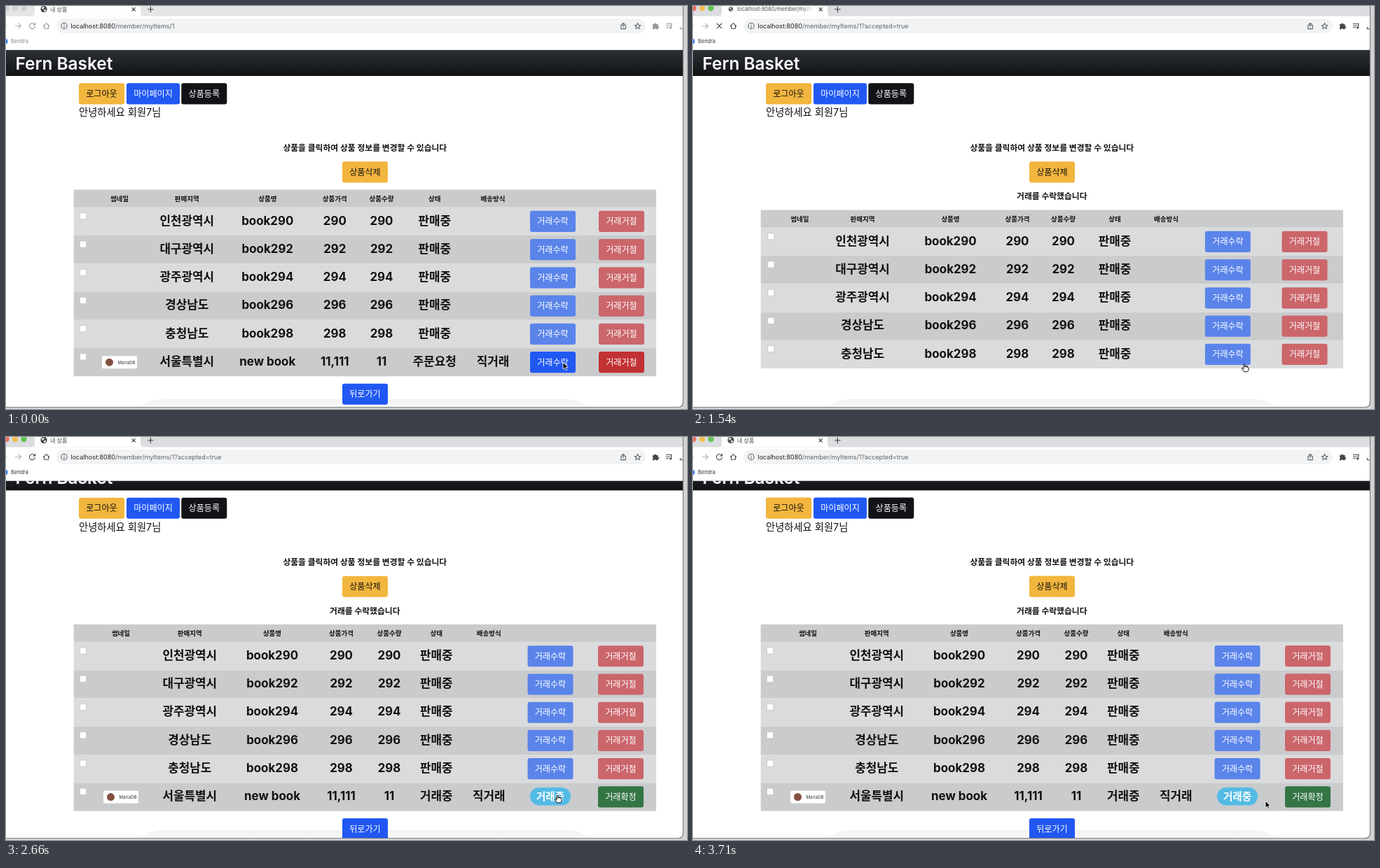
An HTML page that plays this animation: 972 by 576 pixels, repeating every 3.78 s.

```html
<!DOCTYPE html>
<html lang="ko">
<head>
<meta charset="utf-8">
<title>내 상품</title>
<style>
html, body { margin: 0; width: 100%; height: 100%; overflow: hidden; background: #fff; }
svg { display: block; width: 972px; height: 576px; }
text { font-family: Inter, "Noto Sans CJK KR", "Noto Sans CJK", sans-serif; white-space: pre; }
.line { fill: none; stroke: currentColor; stroke-width: 1.1; stroke-linecap: round; stroke-linejoin: round; }
</style>
</head>
<body>
<svg id="stage" viewBox="0 0 972 576" xmlns="http://www.w3.org/2000/svg">
  <defs>
    <linearGradient id="bar" x2="0" y2="1">
      <stop offset="0" stop-color="#2d3035"/><stop offset="1" stop-color="#101215"/>
    </linearGradient>
    <linearGradient id="dock" x2="0" y2="1">
      <stop offset="0" stop-color="#f1f1f1"/><stop offset="1" stop-color="#fafafa"/>
    </linearGradient>
    <linearGradient id="fade" gradientUnits="userSpaceOnUse" x1="155" x2="172">
      <stop offset="0" stop-color="#45484c"/><stop offset="1" stop-color="#45484c" stop-opacity="0"/>
    </linearGradient>
    <clipPath id="view"><path d="M0 62.5H966V566Q966 573 959 573H0Z"/></clipPath>
    <clipPath id="tabClip"><rect x="60" width="112" height="14"/></clipPath>
  </defs>
  <rect width="972" height="576" fill="#d3d3d4"/>
  <path d="M0 0H966V566Q966 573 959 573H0Z" fill="#fff"/>
  <g id="page" clip-path="url(#view)">
    <path d="M192 574Q205 562 225 562H800Q820 562 832 574Z" fill="url(#dock)"/>
    <g id="scroll"></g>
  </g>
  <g id="chrome">
    <rect width="966" height="62.5" fill="#fff"/>
    <rect id="strip" width="966" height="14.5" fill="#dee1e6"/>
    <path d="M36 14.5Q41 14.5 41 9V0H192V9Q192 14.5 197 14.5Z" fill="#fff"/>
    <g id="lights"></g>
    <g id="globe">
      <circle r="4.6" fill="#44474b"/>
      <path d="M-3.2-1.6Q-1.5-3.8.4-3.4L.8-1.6-1 .2-2.8-.2ZM-.2 1.2 2.4.4 3.4 1.4Q2.4 3.4.4 3.8Z" fill="#e8eaed"/>
    </g>
    <g id="tabText" clip-path="url(#tabClip)"></g>
    <path class="line" d="M180 2.6l4.4 4.4m0-4.4l-4.4 4.4M202.6 4.8h7.6m-3.8-3.8v7.6" color="#3c4043"/>
    <rect x="72" y="18" width="841" height="21" rx="10.5" fill="#f1f3f4"/>
    <path class="line" color="#aeb1b5" d="M-3 28.5H1M13.5 28.5h8m-3.6-3.6l3.6 3.6-3.6 3.6"/>
    <g id="tools">
      <path id="reload" class="line" d="M40.6 26A4 4 0 1 0 41.4 29.6M41.6 24.2V27H38.8"/>
      <path id="stop" class="line" d="M34.2 25l6.8 6.8m0-6.8l-6.8 6.8"/>
      <path class="line" d="M53.4 28.6l4.2-3.9 4.2 3.9M54.7 27.8v4.4h5.8v-4.4"/>
      <path d="M923 26h2.2a1.6 1.6 0 0 1 3.2 0h2.2v2.4a1.6 1.6 0 0 1 0 3.2v1.6h-2.6a1.4 1.4 0 0 0-2.6 0H923v-2.6a1.4 1.4 0 0 0 0-2.4Z" fill="currentColor"/>
      <path class="line" d="M942.4 25.2h8M942.4 28h5.4M942.4 30.8h3.4M949.6 25.4v5.6"/>
      <circle cx="948.6" cy="31" r="1.5" fill="currentColor"/>
      <path class="line" d="M962.4 30.4v2.4h3.4"/>
    </g>
    <g color="#5f6368">
      <circle class="line" cx="83" cy="28.5" r="4.2"/>
      <path class="line" d="M83 28.3v2.4M83 26.4v.1"/>
      <path class="line" d="M879.6 27.2h-1.8v5.4h6.6v-5.4h-1.8M881.1 30v-5.6m-1.7 1.6l1.7-1.7 1.7 1.7"/>
      <path class="line" d="M901.6 24.4l1.3 2.8 3 .3-2.3 2 .7 3-2.7-1.6-2.7 1.6.7-3-2.3-2 3-.3Z"/>
    </g>
    <circle cx="-1.4" cy="50.5" r="4" fill="#4285f4"/>
  </g>
  <path d="M966.5 0V566Q966.5 573.5 959 573.5H0" fill="none" stroke="#7d7e80" stroke-width="1.2"/>
  <path id="arrow" d="M0 0V10.2L2.4 8.1 4 11.8 5.7 11 4.1 7.4H7.3Z" fill="#111" stroke="#fff" stroke-width=".8"/>
  <path id="hand" d="M-.9 5V.6Q0-.6.9.6V4Q2-.0 2.8 4.3 4-.0 4.6 4.8 6 4 6.2 5.8 6.2 8.6 4.6 10.8H-.6Q-1.4 9-3.6 6.6-4 5-2.4 5.4L-.9 6.8Z" fill="#fff" stroke="#111" stroke-width="1"/>
</svg>
<script>
const NS = 'http://www.w3.org/2000/svg';
const LOOP = 3780, STEP = 70;
const $ = id => document.getElementById(id);

function add(parent, tag, attrs, content) {
  const el = document.createElementNS(NS, tag);
  for (const k in attrs) el.setAttribute(k, attrs[k]);
  if (content) el.textContent = content;
  parent.append(el);
  return el;
}

// y is the vertical middle of the glyphs
function label(parent, str, x, y, size, opt = {}) {
  return add(parent, 'text', {
    x, y: y + size * 0.365, 'font-size': size, 'text-anchor': 'middle', fill: '#111', ...opt
  }, str);
}

function button(parent, str, x, y, w, fill, color = '#fff') {
  const box = add(parent, 'rect', { x, y, width: w, height: 30.2, rx: 3, fill });
  label(parent, str, x + w / 2, y + 15.2, 12.1, { fill: color });
  return box;
}

const BLUE = '#2158f2', BLUE_HOVER = '#1d49c8', RED = '#c23133', GOLD = '#f2b63e';
const BLUE_OFF = '#5a84ea', RED_OFF = '#cb666b', GREEN = '#347544', SKY = '#53bae4';
const BOLD = { 'font-weight': 700 };
const LEFT = { 'text-anchor': 'start' };
const HEAD = ['썸네일', '판매지역', '상품명', '상품가격', '상품수량', '상태', '배송방식'];
const REGIONS = ['인천광역시', '대구광역시', '광주광역시', '경상남도', '충청남도'];
const ROW = 40.24, HEAD_H = 25.3;

// cols: checkbox, seven text columns, two button columns
function table(top, cols, last) {
  const g = add($('scroll'), 'g', {});
  const [check, ...mid] = cols;
  const [accept, reject] = mid.slice(7);
  const band = (y, h, fill) => add(g, 'rect', { x: 96.7, y, width: 831.3, height: h, fill });
  band(top, HEAD_H, '#cacbcd');
  HEAD.forEach((s, i) => label(g, s, mid[i], top + 12.6, 9.5, BOLD));

  const rows = REGIONS.map((r, i) => {
    const n = 290 + 2 * i;
    return [r, 'book' + n, n, n, '판매중', ''];
  });
  if (last) rows.push(['서울특별시', 'new book', '11,111', '11', last, '직거래']);

  let live = null;
  rows.forEach((cells, i) => {
    const y = top + HEAD_H + i * ROW;
    band(y, ROW, i % 2 ? '#cacbcd' : '#dadbdd');
    add(g, 'rect', { x: check - 4.7, y: y + 7.7, width: 9.4, height: 9.4, rx: 2, fill: '#fff', stroke: '#bfc1c4', 'stroke-width': .8 });
    cells.forEach((s, k) => label(g, String(s), mid[k + 1], y + 18.6, 16.9, BOLD));
    const by = y + 5, ax = accept - 32.5, rx = reject - 32.5;
    if (i < 5) {
      button(g, '거래수락', ax, by, 65, BLUE_OFF);
      button(g, '거래거절', rx, by, 65, RED_OFF);
      return;
    }
    add(g, 'rect', { x: mid[0] - 25, y: y + 11.2, width: 50, height: 18, rx: 2, fill: '#fff' });
    add(g, 'circle', { cx: mid[0] - 14.5, cy: y + 20.2, r: 5.5, fill: '#84503f' });
    label(g, 'MariaDB', mid[0] - 2.5, y + 20.4, 6.2, { ...LEFT, fill: '#333' });
    if (last === '주문요청') {
      live = button(g, '거래수락', ax, by, 65, BLUE);
      button(g, '거래거절', rx, by, 65, RED);
    } else {
      add(g, 'rect', { x: accept - 29.3, y: y + 6.4, width: 58.6, height: 26, rx: 13, fill: SKY, stroke: '#a9cfdf', 'stroke-width': .8 });
      label(g, '거래중', accept, y + 19.3, 14.5, { ...BOLD, fill: '#fff' });
      button(g, '거래확정', rx, by, 65, GREEN);
    }
  });
  if (last) button(g, '뒤로가기', 480, top + HEAD_H + 6 * ROW + 10.4, 65, BLUE);
  return { g, live };
}

// page
const page = $('scroll');
add(page, 'rect', { y: 62.5, width: 966, height: 37.5, fill: 'url(#bar)' });
label(page, 'Fern Basket', 13.5, 82, 24.4, { ...LEFT, 'font-weight': 600, fill: '#fff' });
button(page, '로그아웃', 104, 110.3, 65, GOLD, '#111');
button(page, '마이페이지', 172, 110.3, 76, BLUE);
button(page, '상품등록', 250.3, 110.3, 65, '#111316');
label(page, '안녕하세요 회원7님', 104, 152, 14.3, LEFT);
label(page, '상품을 클릭하여 상품 정보를 변경할 수 있습니다', 512.3, 202.7, 11.8, BOLD);
button(page, '상품삭제', 480, 222.3, 65, GOLD, '#111');
const notice = label(page, '거래를 수락했습니다', 512.3, 272, 11.8, BOLD);

const before = table(262.5, [110, 162, 258.3, 373.3, 469.3, 536, 611.8, 695, 780.5, 878.5], '주문요청');
const partial = table(291.5, [111.3, 152.3, 242, 367.5, 463, 528.5, 602, 675.5, 763.3, 873]);
const after = table(291.5, [110, 164, 262.3, 380, 478.5, 547, 614.3, 689.3, 777, 877.5], '거래중');

// browser frame
const lights = ['#ee6a5f', '#f5bd4f', '#61c454'].map((c, i) =>
  [c, add($('lights'), 'circle', { cx: .5 + 12.5 * i, cy: 3, r: 4.2 })]);
const tabName = label($('tabText'), '내 상품', 63, 4.6, 8, { ...LEFT, fill: '#45484c' });
const tabUrl = label($('tabText'), 'localhost:8080/member/myItems', 63, 4.6, 7.6, { ...LEFT, fill: 'url(#fade)' });
const mark = label($('chrome'), 'Bendra', 7, 50.4, 7.4, LEFT);
const url = label($('chrome'), '', 92.5, 28.5, 9, { ...LEFT, fill: '#5f6368' });
add(url, 'tspan', { fill: '#202124' }, 'localhost:8080');
const path = add(url, 'tspan', {}, '');

const show = (el, on) => el.setAttribute('display', on ? 'inline' : 'none');

// linear track through [time, value] points
function track(t, pts) {
  if (t <= pts[0][0]) return pts[0][1];
  for (let i = 1; i < pts.length; i++) {
    const [t0, v0] = pts[i - 1], [t1, v1] = pts[i];
    if (t <= t1) return v0 + (v1 - v0) * (t - t0) / (t1 - t0);
  }
  return pts[pts.length - 1][1];
}

function draw(t) {
  const active = t >= 350;
  const accepted = t >= 1470;
  const full = t >= 1610;
  const loading = t >= 1260 && t < 1750;
  const naming = accepted && loading;
  const pointing = t >= 420 && t < 3430;

  $('strip').setAttribute('fill', active ? '#dbdde0' : '#e4e5e7');
  lights.forEach(([c, el]) => el.setAttribute('fill', active ? c : '#d0d1d3'));
  $('tools').setAttribute('color', active ? '#45484c' : '#96999d');
  mark.setAttribute('fill', active ? '#303336' : '#85888c');
  $('globe').setAttribute('transform', `translate(54 4.4) scale(${naming ? .68 : 1})`);
  show(tabName, !naming);
  show(tabUrl, naming);
  show($('reload'), !loading);
  show($('stop'), loading);
  path.textContent = '/member/myItems/1' + (accepted ? '?accepted=true' : '');

  show(notice, accepted);
  show(before.g, !accepted);
  show(partial.g, accepted && !full);
  show(after.g, full);
  before.live.setAttribute('fill', pointing ? BLUE_HOVER : BLUE);

  const dy = track(t, [[2240, 0], [2520, 19.5], [2800, 27.8], [3010, 27.8], [3290, 23.7]]);
  page.setAttribute('transform', `translate(0 ${-dy})`);

  const x = track(t, [[280, 795], [840, 787], [3360, 787], [3640, 817]]);
  const y = track(t, [[280, 509], [840, 512], [3360, 512], [3640, 520]]);
  for (const id of ['arrow', 'hand']) {
    $(id).setAttribute('transform', `translate(${x} ${y})`);
    show($(id), (id === 'hand') === pointing);
  }
}

let start = null;
function tick(now) {
  if (start === null) start = now;
  draw(Math.floor((now - start) % LOOP / STEP) * STEP);
  requestAnimationFrame(tick);
}
draw(0);
requestAnimationFrame(tick);
</script>
</body>
</html>
```
